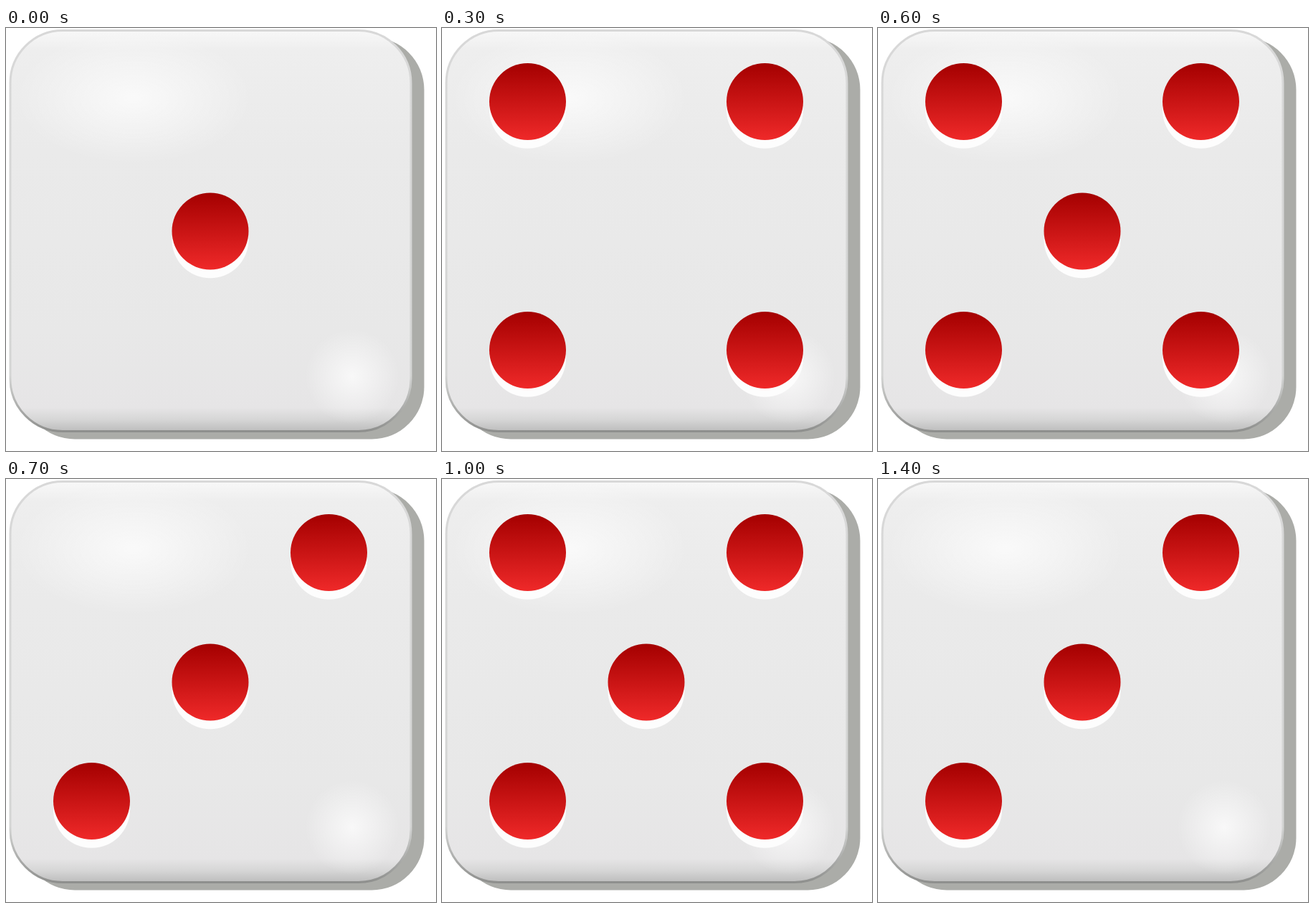
These frames come from a looping animation (600 by 589 pixels, 1500 ms). An HTML page:

```html
<!DOCTYPE html>
<html lang="en">
<head>
<meta charset="utf-8">
<title>Rolling die</title>
<style>
  html, body { margin: 0; width: 100%; height: 100%; overflow: hidden; background: #fff; }
  svg { display: block; width: 600px; height: 589px; }
</style>
</head>
<body>
<svg viewBox="0 0 600 589">
  <defs>
    <linearGradient id="face" x1="0" y1="3" x2="0" y2="562" gradientUnits="userSpaceOnUse">
      <stop offset="0" stop-color="#f8f8f8"/>
      <stop offset=".05" stop-color="#eeeeee"/>
      <stop offset=".3" stop-color="#eaeaea"/>
      <stop offset=".75" stop-color="#e8e8e8"/>
      <stop offset=".94" stop-color="#e6e5e6"/>
      <stop offset=".97" stop-color="#d6d6d6"/>
      <stop offset="1" stop-color="#bcbcbc"/>
    </linearGradient>
    <linearGradient id="rim" x1="0" y1="3" x2="0" y2="562" gradientUnits="userSpaceOnUse">
      <stop offset="0" stop-color="#d8d8d8"/>
      <stop offset=".86" stop-color="#d4d5d4"/>
      <stop offset="1" stop-color="#8e8f8d"/>
    </linearGradient>
    <linearGradient id="red" x1="0" y1="0" x2="0" y2="1">
      <stop offset="0" stop-color="#a40000"/>
      <stop offset="1" stop-color="#ef2929"/>
    </linearGradient>
    <radialGradient id="glow">
      <stop offset="0" stop-color="#fff" stop-opacity=".72"/>
      <stop offset="1" stop-color="#fff" stop-opacity="0"/>
    </radialGradient>
    <g id="pip">
      <circle cy="11.8" r="53.5" fill="#fdfdfd"/>
      <circle r="53.5" fill="url(#red)"/>
    </g>
  </defs>
  <rect x="23" y="13" width="560.5" height="559.5" rx="73" fill="#abaca8"/>
  <rect x="6" y="3.5" width="559" height="558" rx="73" fill="url(#face)" stroke="url(#rim)" stroke-width="3"/>
  <ellipse cx="178" cy="97" rx="165" ry="92" fill="url(#glow)"/>
  <circle cx="483" cy="485" r="66" fill="url(#glow)"/>
  <g id="pips"></g>
</svg>
<script>
  const STEP = 100;
  const ROLLS = [1, 2, 3, 4, 5, 6, 5, 3, 2, 6, 5, 6, 4, 2, 3];

  const odd = n => n % 2 === 1;
  const atLeast = min => n => n >= min;
  // Each pip: centre and the values that show it
  const PIPS = [
    [119.5, 102.5, atLeast(4)],
    [450.5, 102.5, atLeast(2)],
    [119.5, 275.5, atLeast(6)],
    [285, 283, odd],
    [450.5, 275.5, atLeast(6)],
    [119.5, 448.5, atLeast(2)],
    [450.5, 448.5, atLeast(4)]
  ];

  const layer = document.getElementById('pips');
  const nodes = PIPS.map(([x, y]) => {
    const node = document.createElementNS('http://www.w3.org/2000/svg', 'use');
    node.setAttribute('href', '#pip');
    node.setAttribute('x', x);
    node.setAttribute('y', y);
    return layer.appendChild(node);
  });

  function show(value) {
    PIPS.forEach(([, , lit], i) => {
      nodes[i].style.display = lit(value) ? '' : 'none';
    });
  }

  const start = performance.now();
  function tick() {
    const elapsed = performance.now() - start;
    show(ROLLS[Math.floor(elapsed / STEP) % ROLLS.length]);
    requestAnimationFrame(tick);
  }
  tick();
</script>
</body>
</html>
```
